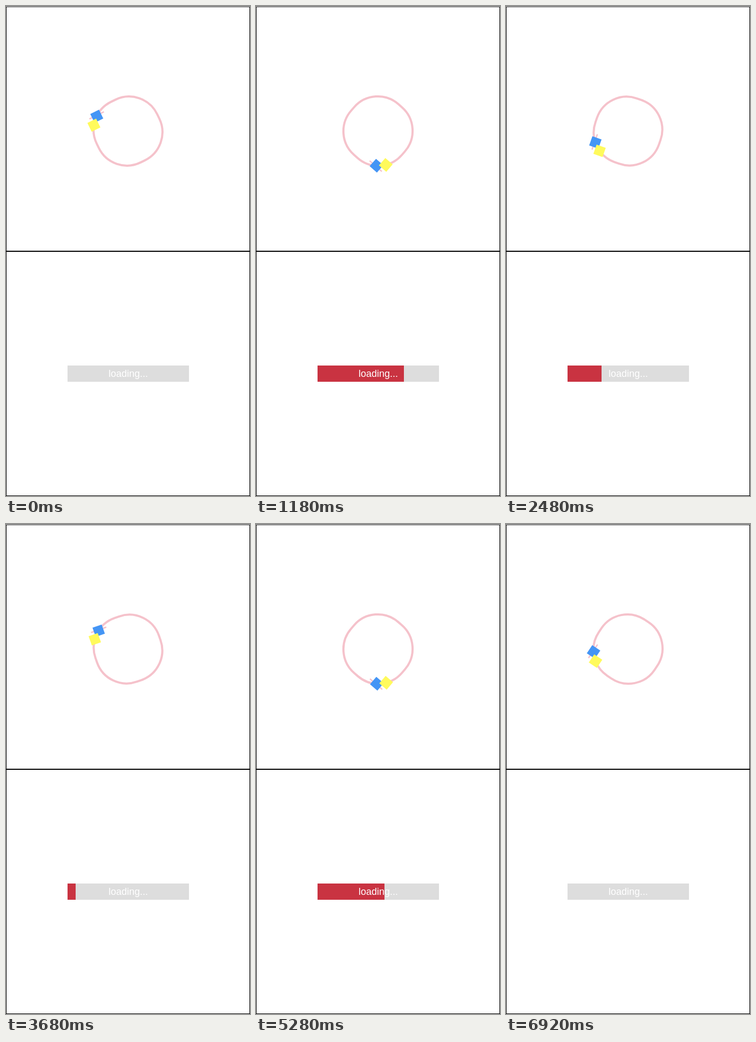
An HTML page that plays this animation: 452 px wide and 905 px high, repeating every 6.94 s.

```html
<!DOCTYPE html>
<html lang="en">
<head>
<meta charset="utf-8">
<title>Loading</title>
<style>
  html, body { margin: 0; width: 100%; height: 100%; overflow: hidden; background: #fff; }
  svg { display: block; }
  text { font: 18px "Liberation Sans", Arial, sans-serif; fill: #fff; text-anchor: middle; }
</style>
</head>
<body>
<svg width="452" height="905" viewBox="0 0 452 905">
  <g fill="none" stroke="#000">
    <rect x=".5" y="1.5" width="451" height="451"/>
    <rect x=".5" y="453.5" width="451" height="451"/>
  </g>
  <g id="ring">
    <g fill="none" stroke="#f5c2cb">
      <rect x="-62.3" y="-62.3" width="124.6" height="124.6" rx="58" stroke-width="4"/>
      <path d="M-54.5 -51.5h30" stroke-width="2.5"/>
    </g>
    <rect x="-49" y="-59" width="18" height="18" fill="#4495f5"/>
    <rect x="-61" y="-46.5" width="18" height="18" fill="#fffa5c"/>
  </g>
  <rect x="114" y="664" width="225" height="30" fill="#ddd"/>
  <rect id="bar" x="114" y="664" width="0" height="30" fill="#c93341"/>
  <text x="226.5" y="685">loading...</text>
</svg>
<script>
const LOOP = 6940, STEP = 20, PAUSE = 100, FULL = 225;
const pauses = [680, 2480, 2780, 4360, 5620];

const linear = u => u;

// cubic-bezier(.25, .1, .25, 1), solved with Newton's method
function ease(u) {
  let s = u;
  for (let i = 0; i < 8; i++) {
    s -= (.75 * s * (1 - s) + s ** 3 - u) / (.75 - 1.5 * s + 3 * s * s);
  }
  return .3 * s * (1 - s) ** 2 + 3 * s * s * (1 - s) + s ** 3;
}

// Each stop: time in ms, value, easing on the way there (default: ease)
// Degrees: settle, launch, drift on, and again
const spin = [
  [0, -26], [260, -29], [1460, 230], [3450, 346, linear],
  [4460, 331], [5540, 590], [LOOP, 665, linear]
];
// Pixels filled: two pulses with rests between
const fill = [
  [0, 0], [600, 0], [1980, FULL], [3150, 0],
  [3570, 0], [4950, FULL], [6180, 0], [LOOP, 0]
];

function sample(stops, t) {
  const i = stops.findIndex(([time]) => time > t);
  const [t0, from] = stops[i - 1], [t1, to, curve = ease] = stops[i];
  return from + (to - from) * curve((t - t0) / (t1 - t0));
}

const ring = document.getElementById("ring");
const bar = document.getElementById("bar");
const start = performance.now();

function draw() {
  let t = Math.max(0, performance.now() - start) % LOOP;
  t -= t % STEP;
  t = pauses.find(p => t >= p && t < p + PAUSE) ?? t;
  ring.setAttribute("transform", `translate(226 231) rotate(${sample(spin, t)})`);
  bar.setAttribute("width", Math.round(sample(fill, t)));
  requestAnimationFrame(draw);
}
draw();
</script>
</body>
</html>
```
